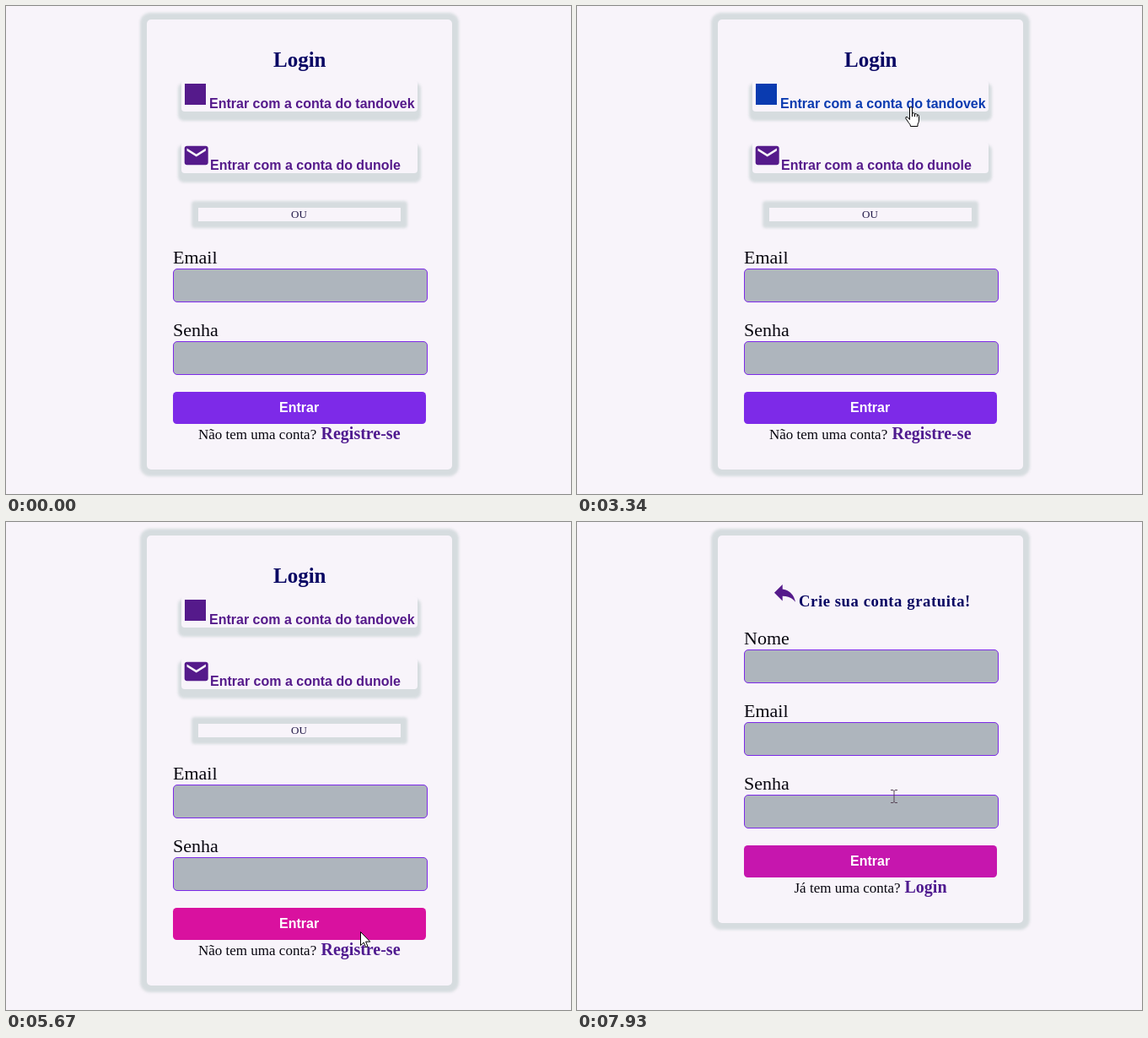
Write an HTML page that moves like this. It is 670x578 px and loops after 8 s.

```html
<!DOCTYPE html>
<html lang="pt">
<head>
<meta charset="utf-8">
<title>Login</title>
<style>
  html, body { margin: 0; width: 100%; height: 100%; overflow: hidden; background: #f8f4fa; }
  svg { display: block; width: 670px; height: 578px; }
  text { font: 17px "Liberation Serif", "Times New Roman", serif; fill: #08060f; }
  .panel { fill: #f8f4fa; }
  .shade { fill: #d6dcdf; filter: blur(1.6px); }
  .field { fill: #aeb5bd; stroke: #7d2ae8; }
  .label { font-size: 22px; }
  .title { font-weight: bold; font-size: 25px; fill: #070563; }
  .small { font-size: 18.72px; letter-spacing: .55px; }
  .more { font-weight: bold; font-size: 20px; }
  .sans { font: bold 16px "Liberation Sans", Arial, sans-serif; fill: inherit; }
  .white { fill: #fff; }
  .pointer { fill: #fff; stroke: #000; stroke-linejoin: round; }
</style>
</head>
<body>
<svg viewBox="0 0 670 578">
  <defs>
    <rect id="field" class="field" x="198.5" y=".5" width="301" height="39" rx="4.5"/>
    <rect id="bar" x="198" width="300" height="38" rx="4.5"/>
    <g id="drop">
      <rect class="shade" x="204" y="3" width="288" height="45" rx="7"/>
      <rect class="panel" x="208" width="280" height="37" rx="4"/>
    </g>
  </defs>

  <g id="login">
    <rect class="shade" x="159" y="8" width="378" height="549" rx="12"/>
    <rect class="panel" x="167" y="16" width="362" height="533" rx="5"/>
    <text class="title" x="317" y="72">Login</text>
    <use href="#drop" y="88"/>
    <g data-hit="social">
      <rect x="212" y="92" width="25" height="25"/>
      <text class="sans" x="241" y="121">Entrar com a conta do tandovek</text>
    </g>
    <use href="#drop" y="161"/>
    <g data-hit="social">
      <path transform="translate(208.9 160.2) scale(1.4)" d="M20 4H4c-1.1 0-2 .9-2 2v12c0 1.1.9 2 2 2h16c1.1 0 2-.9 2-2V6c0-1.1-.9-2-2-2zm0 4l-8 5-8-5V6l8 5 8-5z"/>
      <text class="sans" x="242" y="194">Entrar com a conta do dunole</text>
    </g>
    <rect class="shade" x="220" y="231" width="256" height="32" rx="4"/>
    <rect class="panel" x="228" y="239" width="240" height="16"/>
    <text x="338" y="251" style="font-size:13px;fill:#241b4a">OU</text>
    <text class="label" x="198" y="305">Email</text>
    <use href="#field" y="311" data-hit="field"/>
    <text class="label" x="198" y="391">Senha</text>
    <use href="#field" y="397" data-hit="field"/>
    <use href="#bar" y="457" data-hit="button"/>
    <text class="sans white" x="324" y="481">Entrar</text>
    <text x="228" y="513">Não tem uma conta?</text>
    <text class="more" x="373.5" y="513" data-hit="link">Registre-se</text>
  </g>

  <g id="signup">
    <rect class="shade" x="159" y="8" width="378" height="475" rx="12"/>
    <rect class="panel" x="167" y="16" width="362" height="459" rx="5"/>
    <path fill="#551a8b" transform="translate(229.8 67) scale(1.39)" d="M10 9V5l-7 7 7 7v-4.1c5 0 8.5 1.6 11 5.1-1-5-4-10-11-11z"/>
    <text class="title small" x="263" y="100">Crie sua conta gratuita!</text>
    <text class="label" x="198" y="145">Nome</text>
    <use href="#field" y="151" data-hit="field"/>
    <text class="label" x="198" y="231">Email</text>
    <use href="#field" y="237" data-hit="field"/>
    <text class="label" x="198" y="317">Senha</text>
    <use href="#field" y="323" data-hit="field"/>
    <use href="#bar" y="383" data-hit="button"/>
    <text class="sans white" x="324" y="407">Entrar</text>
    <text x="257.5" y="439">Já tem uma conta?</text>
    <text class="more" x="388.5" y="439" data-hit="link">Login</text>
  </g>

  <g id="cursor">
    <path id="arrow" class="pointer" d="M.5.5v16.1l3.7-3.6 2.4 5.6 2.4-1-2.4-5.5h5.2z"/>
    <g id="hand" transform="translate(-8 0)">
      <path class="pointer" d="M5.5 15.5V2a1.5 1.5 0 0 1 3 0v6q2.5-1 3 .8 2.3-.8 2.8 1 2.2-.5 2.2 2V16q0 3-1.5 5v2.5H6.5q0-2-2-4L.9 14.2q-.6-2.2 1.8-1.8z"/>
      <path d="M8.5 8v4M11.5 9v3.2M14.3 10v2.5" stroke="#000" fill="none"/>
    </g>
    <path id="beam" d="M-4-7.5h3l1 1 1-1h3M0-7V7M-4 7.5h3l1-1 1 1h3" fill="none" stroke="#574556"/>
  </g>
</svg>
<script>
  const LOOP = 8000, STEP = LOOP / 104, FADE = 300, LOADING = 6150, SWITCH = 6380;
  const $ = id => document.getElementById(id);

  const kinds = {
    button: { cursor: 'arrow', from: [125, 42, 232], to: [217, 17, 159], fadeOut: true },
    social: { cursor: 'hand', from: [85, 26, 139], to: [10, 59, 176] },
    link: { cursor: 'hand', from: [79, 26, 143], to: [125, 42, 232] },
    field: { cursor: 'beam' }
  };
  const spots = [...document.querySelectorAll('[data-hit]')].map(el => ({
    el, box: el.getBoundingClientRect(), page: el.closest('#login') ? 0 : 1,
    phase: 0, ...kinds[el.dataset.hit]
  }));

  // Pointer strokes: start, end, destination
  const home = [672, 580];
  const strokes = [
    [380, 750, 400, 506],
    [900, 1050, 404, 480],
    [1150, 1230, 406, 498],
    [1230, 1550, 397, 503],
    [2050, 2410, 394, 132],
    [2500, 2720, 397, 119],
    [3340, 3420, 393, 152],
    [3480, 3800, 392, 188],
    [3960, 4590, 392, 344],
    [4660, 4840, 406, 394],
    [4840, 5300, 418, 482],
    [5480, 6060, 435, 504],
    [6800, 7050, 455, 410],
    [7080, 7620, 430, 420],
    [7620, 7690, 413, 417],
    [7850, 7920, 376, 325]
  ];

  const clamp = v => Math.min(1, Math.max(0, v));
  const smooth = u => u * u * (3 - 2 * u);
  const mix = (a, b, k) => a.map((v, i) => Math.round(v + (b[i] - v) * k));

  function pointer(t) {
    let at = home;
    for (const [start, end, ...to] of strokes)
      at = mix(at, to, smooth(clamp((t - start) / (end - start))));
    return at;
  }

  // cubic-bezier(.25, .1, .25, 1)
  function ease(x) {
    const curve = (s, a, b) => 3 * s * (1 - s) ** 2 * a + 3 * s * s * (1 - s) * b + s ** 3;
    let lo = 0, hi = 1;
    for (let i = 0; i < 20; i++) {
      const mid = (lo + hi) / 2;
      if (curve(mid, .25, .25) < x) lo = mid; else hi = mid;
    }
    return curve(hi, .1, 1);
  }

  function hover(spot, over, dt) {
    const rate = dt / FADE;
    if (over) spot.phase = clamp(spot.phase + rate);
    else spot.phase = spot.fadeOut ? clamp(spot.phase - rate) : 0;
    const level = over ? ease(spot.phase) : 1 - ease(1 - spot.phase);
    return spot.from && `rgb(${mix(spot.from, spot.to, level)})`;
  }

  // Run the hover fades once through the loop, keeping one pose per step
  function record() {
    const poses = [], parts = 8, dt = STEP / parts;
    for (let i = 0; i < LOOP / dt; i++) {
      const t = i * dt, [x, y] = pointer(t), page = t < SWITCH ? 0 : 1;
      const target = spots.find(({ box, page: p }) => p === page &&
        x >= box.left && x < box.right && y >= box.top && y < box.bottom);
      const fills = spots.map(s => hover(s, s === target, dt));
      const cursor = target && (page || t < LOADING) ? target.cursor : 'arrow';
      if (i % parts === 0) poses.push({ x, y, fills, cursor });
    }
    return poses;
  }

  const poses = record();
  const show = (id, on) => $(id).style.display = on ? '' : 'none';

  function draw(t) {
    const { x, y, fills, cursor } = poses[Math.floor(t / STEP)];
    show('login', t < SWITCH);
    show('signup', t >= SWITCH);
    $('cursor').setAttribute('transform', `translate(${x} ${y})`);
    for (const id of ['arrow', 'hand', 'beam']) show(id, id === cursor);
    spots.forEach((s, i) => { if (fills[i]) s.el.style.fill = fills[i]; });
  }

  const begin = performance.now();
  function tick() {
    draw((performance.now() - begin) % LOOP);
    requestAnimationFrame(tick);
  }
  tick();
</script>
</body>
</html>
```
